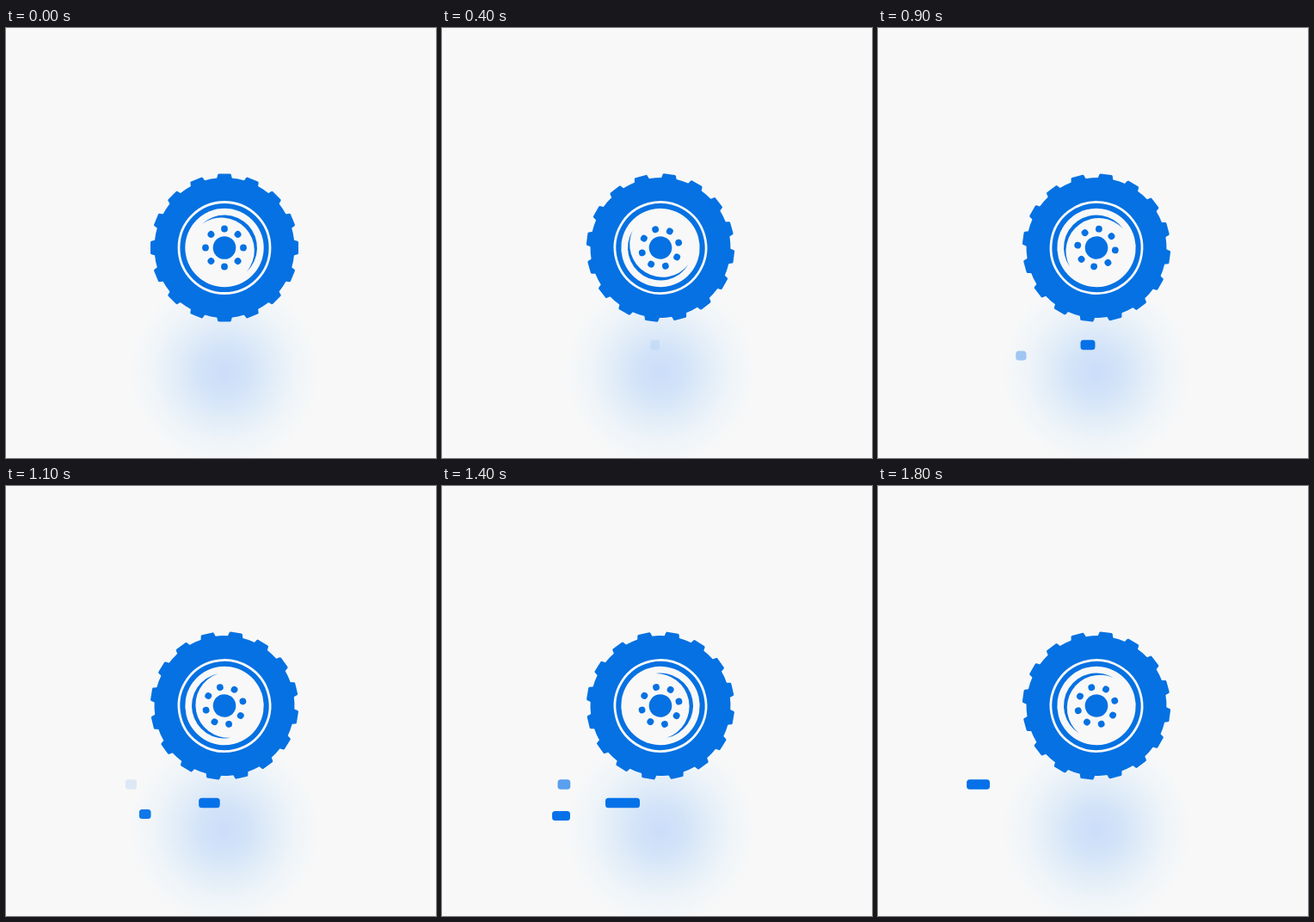
Animation, 500 px wide and 500 px high, one loop 1.9 s. Source, as an HTML page:

```html
<!DOCTYPE html>
<html lang="en">
<head>
<meta charset="utf-8">
<title>Rolling tyre</title>
<style>
  html, body { margin: 0; width: 100%; height: 100%; overflow: hidden; background: #f8f8f8; }
  svg { display: block; width: 100vw; height: 100vh; }
</style>
</head>
<body>
<svg viewBox="0 0 500 500">
  <defs>
    <radialGradient id="glow">
      <stop offset="0" stop-color="#cbddfa"/>
      <stop offset=".25" stop-color="#d3e3f8"/>
      <stop offset=".5" stop-color="#e2edf8"/>
      <stop offset=".75" stop-color="#f0f5f9"/>
      <stop offset="1" stop-color="#f8f8f8"/>
    </radialGradient>
  </defs>
  <circle cx="254" cy="400" r="112" fill="url(#glow)"/>
  <g id="lines" fill="#0571e8"></g>
  <g id="wheel" fill="#0571e2">
    <circle r="81.5"/>
    <g id="teeth" stroke="#0571e2" stroke-width="3" stroke-linejoin="round"></g>
    <circle r="53" fill="none" stroke="#f8f8f8" stroke-width="2.8"/>
    <circle r="45.7" fill="#f8f8f8"/>
    <path d="M0-38A38 38 0 0 1 0 38A38.3 38.3 0 0 0 0-38Z" transform="rotate(-43)"/>
    <circle r="13.3"/>
    <g id="bolts"></g>
  </g>
</svg>
<script>
const LOOP = 1900, STEP = 100;
const $ = id => document.getElementById(id);
const clamp = v => Math.max(0, Math.min(1, v));

const ring = (count, shape) => Array.from({ length: count },
  (_, i) => `<g transform="rotate(${i * 360 / count})">${shape}</g>`).join('');
$('teeth').innerHTML = ring(16, '<path d="M-6.3-84.5H6.3L8-78H-8Z"/>');
$('bolts').innerHTML = ring(8, '<circle cy="-22" r="3.9"/>');

// Wheel angle in degrees at each time
const spin = [[0, 0], [400, 524.5], [600, 731], [900, 997.5],
  [1100, 1291.5], [1400, 1832], [1800, 2415], [1900, 2520]];

function angleAt(t) {
  const i = spin.findIndex(key => key[0] > t);
  const [t0, a0] = spin[i - 1], [t1, a1] = spin[i];
  return a0 + (a1 - a0) * (t - t0) / (t1 - t0);
}

// Both ends accelerate to the left; pullL and pullR are px per cubic second
const lines = [
  { left: 242, right: 253, y: 368.5, h: 11.5, start: 400, lag: 300, pullL: 52, pullR: 67, drop: 0,
    fadeIn: 367, fadeTime: 465, fadeOut: 1500 },
  { left: 161, right: 173, y: 381, h: 11, start: 700, lag: 0, pullL: 96, pullR: 70, drop: 7,
    fadeIn: 785, fadeTime: 330, fadeOut: 1600 },
  { left: 139, right: 152, y: 347, h: 11.5, start: 1000, lag: 0, pullL: 70, pullR: 43, drop: 0,
    fadeIn: 1040, fadeTime: 550, fadeOut: 1900 },
];
for (const line of lines) {
  line.node = document.createElementNS('http://www.w3.org/2000/svg', 'rect');
  line.node.setAttribute('rx', 3.5);
  $('lines').append(line.node);
}

const cubed = ms => Math.max(0, ms / 1000) ** 3;

function draw(t) {
  $('wheel').setAttribute('transform', `translate(254 255.5) rotate(${angleAt(t)})`);
  for (const l of lines) {
    const lead = cubed(t - l.start);
    const x = l.left - l.pullL * lead;
    const end = l.right - l.pullR * cubed(t - l.start - l.lag);
    const opacity = clamp((t - l.fadeIn) / l.fadeTime) * clamp(1 - (t - l.fadeOut) / 200);
    const attrs = { x, y: l.y - l.h / 2 + l.drop * lead, width: end - x, height: l.h, opacity };
    for (const name in attrs) l.node.setAttribute(name, attrs[name]);
  }
}

const begin = performance.now();
function tick() {
  const t = (performance.now() - begin) % LOOP;
  draw(Math.floor(t / STEP) * STEP);
  requestAnimationFrame(tick);
}
tick();
</script>
</body>
</html>
```
